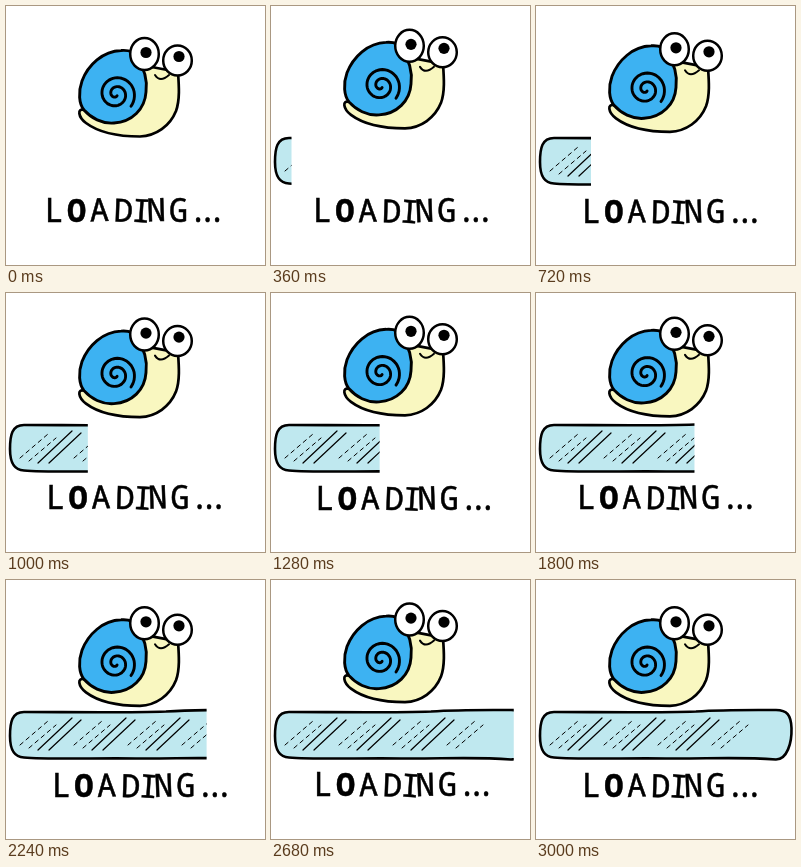
Write an HTML page that moves like this. It is 259 px wide and 259 px high and loops after 3.04 s.

```html
<!DOCTYPE html>
<html lang="en">
<head>
<meta charset="utf-8">
<title>Loading snail</title>
<style>
  html, body { margin: 0; width: 100%; height: 100%; overflow: hidden; background: #fff; }
  svg { display: block; width: 100%; height: 100%; }
  .ink { stroke: #000; stroke-linecap: round; stroke-linejoin: round; }
  .line { fill: none; }
  text {
    font: 500 32px "Noto Sans Mono", "DejaVu Sans Mono", monospace;
    text-anchor: middle; stroke: #000; stroke-width: .5;
  }
</style>
</head>
<body>
<svg viewBox="0 0 259 259">
  <clipPath id="wipe"><rect id="edge" y="120" height="70"/></clipPath>

  <g clip-path="url(#wipe)">
    <path class="ink" fill="#bfe8ef" stroke-width="2.6"
      d="M18 132 C60 132 120 133 160 131.5 C190 129.500 220 130 240 130
         C251 130 255 135 255.5 148 C256 163 251 179.500 240 179.500
         C200 176.500 170 179 130 178.500 C90 178 40 179.500 18 177.500
         C8 177 4 170 4 156 C4 142 6 132 18 132Z"/>
    <g id="shine" class="ink line"></g>
  </g>

  <g id="snail">
    <path class="ink" fill="#f9f7c0" stroke-width="2.7"
      d="M78 104 C71 102 72 111 80 117 C92 126 112 130.500 134 130.500
         C150 130 164 120 170 105 C174 94 173 80 172 66 L130 58 L110 105Z"/>
    <path class="ink" fill="#3db2f2" stroke-width="2.9"
      d="M78 104 C73 98 72 86 76 75 C82 59 97 45 115 44.500
         C122 44 128 46 130 50 C137 60 142 72 140 86
         C139 103 126 116 108 117 C96 118 85 112 78 104Z"/>
    <path class="ink line" stroke-width="2.9" id="spiral"/>
    <g class="ink" fill="#fff" stroke-width="2.5">
      <ellipse cx="138.500" cy="48" rx="14.300" ry="16"/>
      <ellipse cx="171.500" cy="54.500" rx="14.300" ry="15"/>
    </g>
    <circle cx="140" cy="46.500" r="5.600"/>
    <circle cx="173" cy="50.500" r="5.600"/>
    <path class="ink line" stroke-width="2" d="M149 69 Q154 77 163 69"/>
  </g>

  <g id="label">
    <text y="215.500" x="48 70.500 93.500 117 134.500 150.500 172.500 192 201.500 211"
      rotate="0 0 -2 2 4 -2 0">L<tspan font-weight="700">O</tspan>ADING...</text>
  </g>
</svg>
<script>
const $ = id => document.getElementById(id);
const LOOP = 3040, STEP = 40, SWAY = 760;

const slash = (x, y, dx, dy, style) => `<path d="M${x} ${y}l${dx} ${dy}" ${style}/>`;
const solid = 'stroke-width="1.2"', dashed = 'stroke-width="1" stroke-dasharray="4 4"';

// Reflections: dashed and solid pairs alternate along the bar
let shine = '';
for (let k = 0; k < 4; k++) {
  const x = 14 + 54 * k;
  shine += slash(x, 165, 28, -24, dashed) + slash(x + 9, 168, 27, -23, dashed);
  if (k < 3) shine += slash(x + 18, 170, 34, -32, solid) + slash(x + 29, 170, 32, -30, solid);
}
$('shine').innerHTML = shine;

// Shell spiral, opening outwards
let path = '';
for (let i = 0; i <= 90; i++) {
  const a = i / 90 * Math.PI * 3.9, r = 2 + 1.42 * a;
  path += `${i ? 'L' : 'M'}${(110 + r * Math.cos(a + 1)).toFixed(1)} ${(88 + r * Math.sin(a + 1)).toFixed(1)}`;
}
$('spiral').setAttribute('d', path);

function draw(now) {
  const t = Math.floor(now % LOOP / STEP) * STEP;
  const p = t % SWAY / SWAY;
  const lift = 8.5 * Math.sin(2.7 * p);
  const drift = (1 - Math.cos(Math.PI * p)) / 2;
  $('edge').setAttribute('width', Math.max(0, 55 + (t - 720) * 0.0958));
  $('snail').setAttribute('transform', `translate(0 ${-lift})`);
  $('label').setAttribute('transform', `translate(${7.5 * drift} ${1.5 * drift})`);
}

const start = performance.now();
function tick() {
  draw(performance.now() - start);
  requestAnimationFrame(tick);
}
tick();
</script>
</body>
</html>
```
